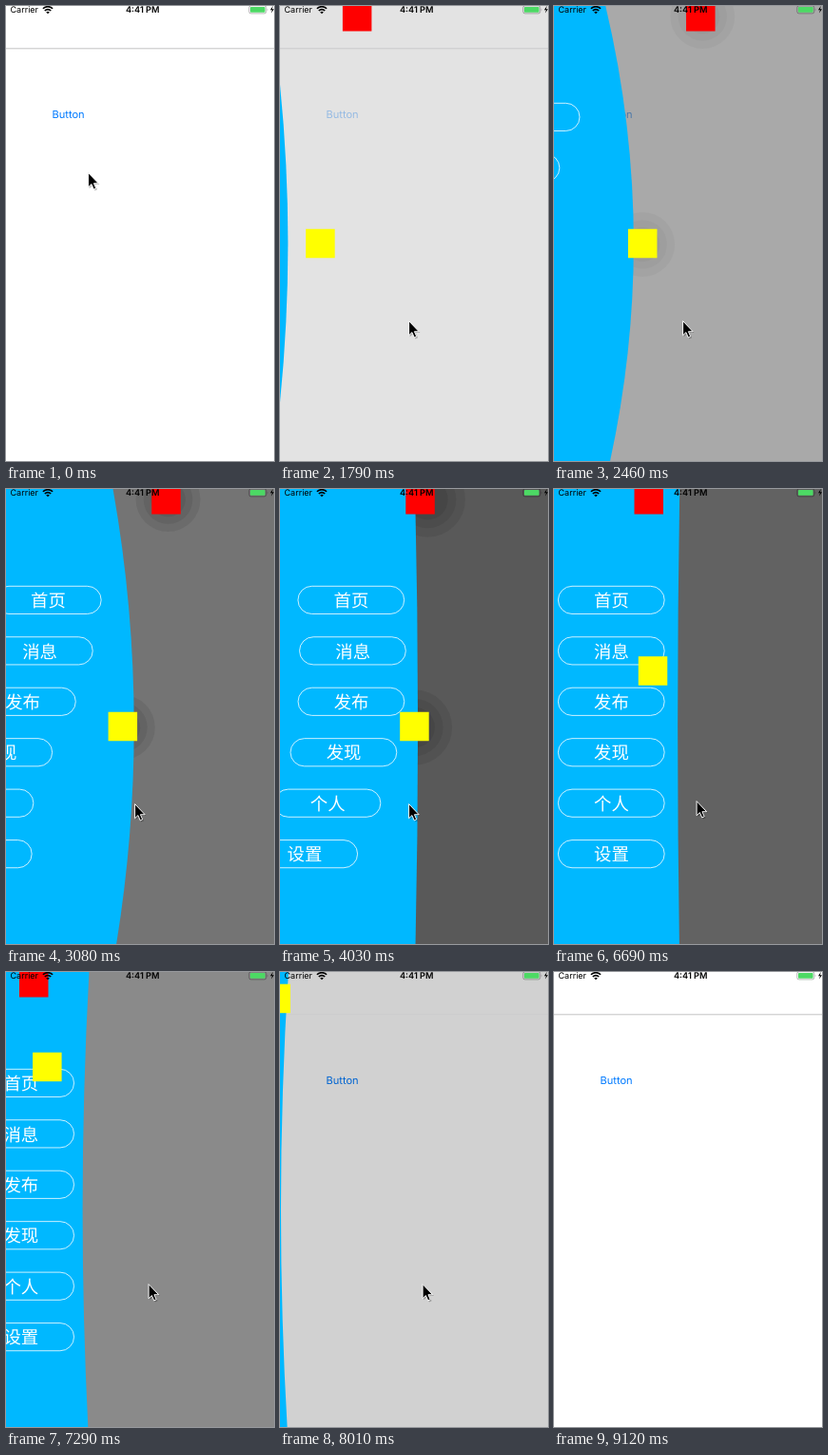
Animation of 282 by 479 pixels, one loop 9.52 s. Source, as an HTML page:

```html
<!DOCTYPE html>
<html lang="zh">
<head>
<meta charset="utf-8">
<title>Elastic side menu</title>
<style>
  html, body { margin: 0; width: 100%; height: 100%; overflow: hidden; background: #fff; }
  svg { display: block; width: 282px; height: 479px; }
  text { font-family: Inter, "Liberation Sans", sans-serif; text-rendering: geometricPrecision; }
  .label { font: 300 18.4px "Noto Sans CJK SC", "Noto Sans CJK", sans-serif; fill: #fff; text-anchor: middle; }
</style>
</head>
<body>
<svg viewBox="0 0 282 479">
  <rect width="282" height="479" fill="#fff"/>
  <rect id="navLine" y="44.3" width="282" height="1" fill="#c2c2c4"/>
  <text id="button" x="48.5" y="117.8" font-size="11.1" fill="#007aff">Button</text>
  <rect id="dim" width="282" height="479" fill="#000"/>
  <g id="halos"></g>
  <g id="menu">
    <path id="sheet" fill="#00b8ff"/>
    <g id="pills" fill="none" stroke="#fff" stroke-width=".8"></g>
  </g>
  <rect id="side" width="30.5" height="30.5" fill="#f00"/>
  <rect id="center" width="30.5" height="30.5" fill="#ff0"/>
  <g id="statusBar">
    <text x="4.5" y="7" font-size="9">Carrier</text>
    <g fill="none" stroke="#000" stroke-width="1.6">
      <path d="M38.9 2.8a7.2 7.2 0 0 1 10.2 0M40.8 5a4.5 4.5 0 0 1 6.4 0"/>
    </g>
    <path d="M42.2 6.4q1.8-1.5 3.6 0L44 8.2Z"/>
    <text x="126" y="7" font-size="9.2" font-weight="600">4:41 PM</text>
    <rect x="255.8" y="-.3" width="18" height="8.2" rx="2" fill="none" stroke="#000" stroke-opacity=".36" stroke-width=".8"/>
    <path d="M274.8 2.4q1.3 1.4 0 2.8Z" fill-opacity=".4"/>
    <rect x="257" y=".9" width="15.6" height="5.8" rx=".8" fill="#4cd964"/>
    <path d="M280.8-.2 278 4.2h2L279 7.6 282 3.2h-2Z"/>
  </g>
  <g id="cursor">
    <path d="M1 1V15.4l3.2-3 2.2 5 2.4-1-2.1-4.9H11Z" fill="#000" opacity=".25"/>
    <path d="M0 0V14l3.1-2.9 2.1 4.9 2.3-1-2.1-4.7H9.8Z" fill="#000" stroke="#fff" stroke-width=".9"/>
  </g>
</svg>
<script>
const LOOP = 9520, OPEN = 945, CLOSE = 6125, SLIDE_BACK = 6240;
const REST = 142, HIDDEN = -15.5, SIZE = 30.5, MID_Y = 250;
const $ = id => document.getElementById(id);
const clamp = (v, a = 0, b = 1) => Math.min(b, Math.max(a, v));
const mix = (a, b, k) => a + (b - a) * k;
const set = (el, attrs) => { for (const k in attrs) el.setAttribute(k, attrs[k]); };

function add(parent, tag, attrs) {
  const el = document.createElementNS('http://www.w3.org/2000/svg', tag);
  set(el, attrs);
  return parent.appendChild(el);
}

// Step response of an underdamped spring; speed is in radians per ms.
function spring(elapsed, damping, speed) {
  if (elapsed <= 0) return 0;
  const x = elapsed * speed, wd = Math.sqrt(1 - damping * damping);
  return 1 - Math.exp(-damping * x) * (Math.cos(wd * x) + damping / wd * Math.sin(wd * x));
}

// cubic-bezier(.42, 0, .58, 1), solved by bisection
function ease(p) {
  if (p <= 0 || p >= 1) return clamp(p);
  let lo = 0, hi = 1, u;
  for (let i = 0; i < 22; i++) {
    u = (lo + hi) / 2;
    const x = 1.26 * u * (1 - u) ** 2 + 1.74 * u * u * (1 - u) + u ** 3;
    if (x < p) lo = u; else hi = u;
  }
  return u * u * (3 - 2 * u);
}

const pills = ['首页', '消息', '发布', '发现', '个人', '设置'].map((name, i) => {
  const g = add($('pills'), 'g', {}), y = 102.3 + 53.45 * i;
  add(g, 'rect', { x: 14.1, y, width: 111.8, height: 29.2, rx: 14.6 });
  add(g, 'text', { x: 70.2, y: y + 21.8, class: 'label', stroke: 'none' }).textContent = name;
  return g;
});

const halos = [0, 1].map(() => [1, .76, .54].map(scale => ({
  scale, el: add($('halos'), 'circle', { fill: '#000', 'fill-opacity': .075 })
})));

// time, x, y
const cursorPath = [
  [0, 87, 176], [300, 87, 176], [720, 65, 114], [1150, 65, 114], [1700, 136, 332],
  [5100, 136, 332], [5400, 219, 290], [5830, 134, 240], [6000, 75, 221],
  [6200, 75, 221], [6620, 150.5, 329], [8860, 150.5, 329], [9120, 184, 482]
];

function cursorAt(t) {
  const i = cursorPath.findIndex(p => p[0] > t);
  if (i < 0) return null;
  const [t0, x0, y0] = cursorPath[i - 1], [t1, x1, y1] = cursorPath[i];
  const p = (t - t0) / (t1 - t0), k = p * p * (3 - 2 * p);
  return [mix(x0, x1, k), mix(y0, y1, k)];
}

function draw(t) {
  const closing = t >= CLOSE;
  const shown = t < SLIDE_BACK ? ease((t - OPEN) / 2970) : 1 - ease((t - SLIDE_BACK) / 2790);
  const sideK = closing ? 1 - spring(t - CLOSE, .6, .00157) : spring(t - OPEN, .49, .00177);
  const backK = spring(t - CLOSE + 30, .7, .00145);
  const centerK = spring(t - OPEN + 70, .8, .00129) - backK;
  const sideX = mix(HIDDEN, REST, sideK);
  const centerX = mix(HIDDEN, REST, centerK);
  const centerY = mix(MID_Y, 11, backK);
  const active = t >= OPEN - 70 && t < 9080;

  set($('dim'), { opacity: .65 * shown });
  set($('navLine'), { opacity: clamp(1 - 3.2 * shown) });
  const pressed = mix(1, .25, clamp((t - 890) / 60));
  set($('button'), { opacity: t < 950 ? pressed : mix(.25, 1, clamp((t - 1500) / 2400)) });

  const edge = mix(-42, REST, shown), bend = sideX - centerX;
  set($('sheet'), { d: `M-90-4H${edge}Q${edge + bend} ${MID_Y} ${edge} 504H-90Z` });
  const settle = clamp(1 - (t - CLOSE) / 400);
  pills.forEach((g, i) => {
    const slide = -68.6 * settle * (1 - spring(t - 1140 - 450 * i, .6, .00166));
    set(g, { transform: `translate(${edge - REST + slide})` });
  });
  const visibility = active ? 'visible' : 'hidden';
  set($('menu'), { visibility });

  const spread = clamp((t - 3080) / 1500);
  const spots = [[sideX + 2 + 9 * spread, 11], [centerX, centerY + 1]];
  halos.forEach((rings, i) => rings.forEach(({ el, scale }) =>
    set(el, { cx: spots[i][0], cy: spots[i][1], r: scale * (34 + 9 * spread) })));
  set($('halos'), { opacity: clamp((shown - .3) / .5) * settle });

  set($('side'), { x: sideX - SIZE / 2, y: -4, visibility });
  set($('center'), { x: centerX - SIZE / 2, y: centerY - SIZE / 2, visibility });

  const pos = cursorAt(t);
  set($('cursor'), pos
    ? { transform: `translate(${pos[0] - .4} ${pos[1] - .4}) scale(1.08)`, visibility: 'visible' }
    : { visibility: 'hidden' });
}

const start = performance.now();
function tick() {
  draw((performance.now() - start) % LOOP);
  requestAnimationFrame(tick);
}
tick();
</script>
</body>
</html>
```
